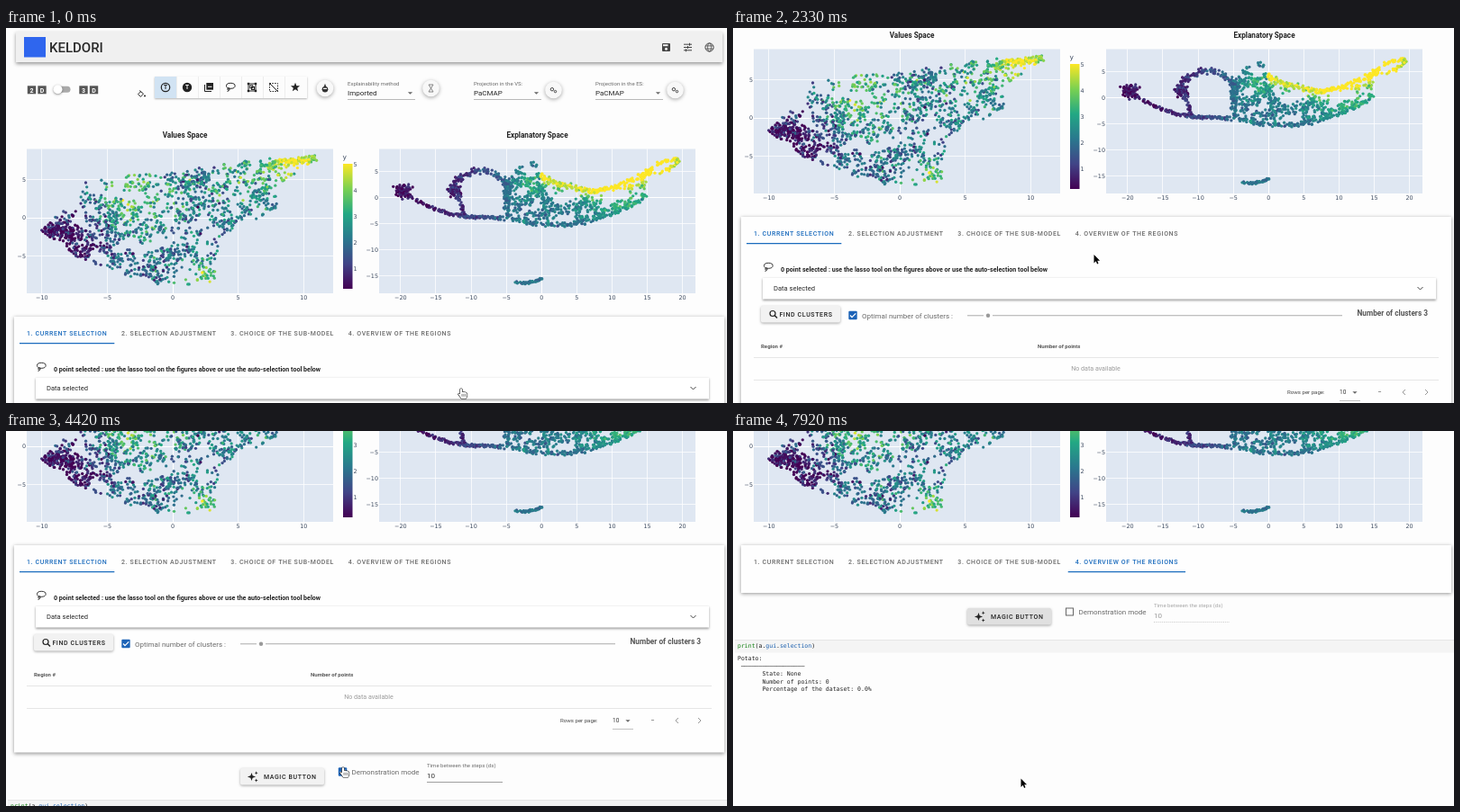
An HTML page with a canvas that plays this animation: 800x417 px, repeating every 8 s.

```html
<!DOCTYPE html>
<html lang="en">
<head>
<meta charset="utf-8">
<title>Explainability dashboard</title>
<style>
html, body { margin: 0; width: 100%; height: 100%; overflow: hidden; background: #fdfdfd; }
canvas { display: block; width: 800px; height: 417px; }
</style>
</head>
<body>
<canvas id="stage" width="800" height="417"></canvas>
<script>
const W = 800, H = 417, LOOP = 8000, STEP = 1000 / 12;
const UNCHECK = 4580, PRESS = 7750;
const BLUE = '#1a6bbd', INK = '#252525', GREY = '#6a6a6a';
let c = document.getElementById('stage').getContext('2d');

// ---- drawing helpers ----
function text(s, x, y, size, color = INK, o = {}) {
  c.font = `${o.weight || 400} ${size}px ${o.family || 'Roboto, sans-serif'}`;
  c.letterSpacing = (o.gap || 0) + 'px';
  c.textAlign = o.align || 'left';
  c.fillStyle = color;
  c.fillText(s, x, y);
  return c.measureText(s).width;
}

function box(x, y, w, h, color, r = 0) {
  c.fillStyle = color;
  c.beginPath();
  c.roundRect(x, y, w, h, r);
  c.fill();
}

function frame(x, y, size, color, dash = []) {
  c.strokeStyle = color;
  c.lineWidth = 1;
  c.setLineDash(dash);
  c.strokeRect(x - size / 2, y - size / 2, size, size);
  c.setLineDash([]);
}

function disc(x, y, r, color) {
  c.fillStyle = color;
  c.beginPath();
  c.arc(x, y, r, 0, 7);
  c.fill();
}

function ring(x, y, rx, color, width = 1, ry = rx) {
  c.strokeStyle = color;
  c.lineWidth = width;
  c.beginPath();
  c.ellipse(x, y, rx, ry, 0, 0, 7);
  c.stroke();
}

function line(color, width, pts, dash = []) {
  c.strokeStyle = color;
  c.lineWidth = width;
  c.setLineDash(dash);
  c.beginPath();
  pts.forEach(p => c.lineTo(...p));
  c.stroke();
  c.setLineDash([]);
}

function star(x, y, r, inner, tips, color) {
  c.fillStyle = color;
  c.beginPath();
  for (let i = 0; i < tips * 2; i++) {
    const a = Math.PI * (i / tips - .5), d = i % 2 ? inner : r;
    c.lineTo(x + Math.cos(a) * d, y + Math.sin(a) * d);
  }
  c.fill();
}

function chevron(x, y, dx, dy, color) {
  line(color, 1, [[x - dx - dy * 2, y - dy - dx * 2], [x + dx, y + dy], [x - dx + dy * 2, y - dy + dx * 2]]);
}

function caret(x, y) {
  c.fillStyle = '#666';
  c.beginPath();
  [[-2.6, -1.3], [2.6, -1.3], [0, 1.3]].forEach(([dx, dy]) => c.lineTo(x + dx, y + dy));
  c.fill();
}

// Runs a drawing with a soft drop shadow under it.
function raised(blur, dy, alpha, draw) {
  c.save();
  c.shadowColor = `rgba(0,0,0,${alpha})`;
  c.shadowBlur = blur;
  c.shadowOffsetY = dy;
  draw();
  c.restore();
}

function button(x, y, w, label, color) {
  raised(3, 1, .35, () => box(x, y, w, 18.5, color, 2));
  text(label, x + w - 8.5, y + 11.9, 7, '#222', { weight: 500, gap: .625, align: 'right' });
}

function checkbox(x, y, on) {
  if (!on) return frame(x, y, 8, '#666');
  box(x - 4.7, y - 4.7, 9.4, 9.4, '#1c63b7', 1);
  line('#fff', 1.2, [[x - 3, y], [x - 1, y + 2.2], [x + 3.2, y - 2.2]]);
}

function search(x, y, r, color) {
  ring(x - 1, y - 1, r, color, 1.2);
  line(color, 1.4, [[x - 1 + r * .7, y - 1 + r * .7], [x + r + 1, y + r + 1]]);
}

function plus(x, y, r, color, turn = 0) {
  for (const a of [turn, turn + Math.PI / 2]) {
    const dx = Math.cos(a) * r, dy = Math.sin(a) * r;
    line(color, 1, [[x - dx, y - dy], [x + dx, y + dy]]);
  }
}

function lasso(x, y, size, color) {
  const s = size / 12;
  ring(x + .3 * s, y - 1.7 * s, 4.8 * s, color, s, 3 * s);
  ring(x - 2 * s, y + 2 * s, 1.2 * s, color, s);
  line(color, s, [[x - 1.8 * s, y + 3.2 * s], [x - 3.4 * s, y + 5 * s]]);
}

// ---- scatter plots ----
function seeded(a) {
  return () => {
    a = a + 0x6D2B79F5 | 0;
    let t = Math.imul(a ^ a >>> 15, 1 | a);
    t = t + Math.imul(t ^ t >>> 7, 61 | t) ^ t;
    return ((t ^ t >>> 14) >>> 0) / 4294967296;
  };
}
const rand = seeded(41);
const bell = () => rand() + rand() + rand() + rand() - 2;

const VIRIDIS = [[68, 1, 84], [65, 68, 135], [42, 120, 142], [34, 168, 132], [122, 209, 81], [253, 231, 37]];
function viridis(u) {
  const p = Math.max(0, Math.min(.9999, u)) * 5, i = Math.floor(p);
  return `rgb(${VIRIDIS[i].map((v, k) => Math.round(v + (VIRIDIS[i + 1][k] - v) * (p - i)))})`;
}

const bump = (x, y, cx, cy, r) => Math.exp(-((x - cx) ** 2 + (y - cy) ** 2) / r ** 2);

const leftValue = (x, y) => 1.9 + bell() * 1.2
  - 1.7 * bump(x, y, 65, 235, 48)
  + 1.9 * bump(x, y, 140, 185, 42)
  + 3.2 * bump(x, y, 322, 147, 36)
  + 1.1 * bump(x, y, 255, 165, 38)
  + 2.1 * bump(x, y, 220, 284, 24);

const ridge = x => 180 - .0052 * (x - 650) ** 2;
const keel = x => 219 - .0031 * (x - 610) ** 2;
const crown = x => x < 591 ? 149 + .03 * (x - 583) ** 2 : ridge(x);

function rightValue(x, y) {
  const noise = bell() * .6;
  if (x < 556) return .4 + 1.5 * ((x - 440) / 115) ** 2 + noise;
  const crest = x > 592 ? 2.6 * Math.exp(-(((y - ridge(x)) / 9) ** 2)) : 0;
  return 2.1 + noise + crest + 1.2 * bump(x, y, 582, 173, 16) + 1.2 * bump(x, y, 690, 185, 40)
    + 2.6 * bump(x, y, 735, 152, 26);
}

// Tight clumps of points kept inside a region.
function clumps(count, spread, pick, inside) {
  const out = [];
  while (out.length < count) {
    const [x, y] = pick();
    for (let i = 0; i < 7; i++) {
      const p = [x + bell() * spread, y + bell() * spread];
      if (inside(...p)) out.push(p);
    }
  }
  return out;
}

function curve(count, jitter, at) {
  return Array.from({ length: count }, () => {
    const [x, y] = at(rand());
    return [x + bell() * jitter, y + bell() * jitter];
  });
}
const blob = (count, size, x, y) => curve(count, size, () => [x, y]);
const arc = (x, y, rx, ry, a) => [x + Math.cos(a) * rx, y + Math.sin(a) * ry];

function leftDots() {
  const edge = new Path2D('M39 225L62 203 78 200 88 166 180 161 285 145 347 143 306 172 301 200 236 235 232 285 160 285 72 252z');
  const inside = (x, y) => c.isPointInPath(edge, x, y);
  return [
    ...clumps(1550, 7, () => [38 + rand() * 310, 143 + rand() * 143], inside),
    ...curve(110, 3.5, s => [283 + 60 * s, 153 - 7 * s]),
    ...curve(90, 6, s => [45 + 55 * s, 225 + 8 * s * s])
  ];
}

function rightDots() {
  const inMass = (x, y) => x > 555 && x < 712 && y > crown(x) && y < keel(x);
  return [
    ...blob(75, 6.5, 441, 181),
    ...curve(150, 1.6, s => [443 + 110 * s, 211 - 28 * (1 - s) ** 3]),
    ...blob(55, 6.5, 497, 181),
    ...curve(130, 3, s => arc(527, 184, 32, 25, Math.PI * (1 + s))),
    ...curve(40, 2, s => [500 + 8 * s, 178 + 30 * s]),
    ...curve(75, 3, s => [554 + 3 * s, 170 + 40 * s]),
    ...clumps(620, 5, () => [556 + rand() * 155, 146 + rand() * 74], inMass),
    ...curve(140, 2, s => [556 + 152 * s, keel(556 + 152 * s)]),
    ...curve(150, 2.3, s => [592 + 122 * s, ridge(592 + 122 * s)]),
    ...curve(75, 1.8, s => {
      const [x, y] = arc(729, 154, 17, 5, s * 7);
      return [x, y - (x - 729) * .4];
    }),
    ...curve(50, 1.5, s => [565 + 29 * s, 283 - 4 * s ** 4])
  ];
}

const tickFont = { family: '"DejaVu Sans", Verdana, sans-serif' };
const SLATE = '#3c4a60';
const signed = n => String(n).replace('-', '\u2212');

function plot(x, w, xAxis, yAxis, dots, value) {
  box(x, 134.5, w, 160.5, '#dfe7f2');
  for (let n = -xAxis.max; n <= xAxis.max; n += 5) {
    const px = xAxis.zero + n * xAxis.unit;
    box(Math.round(px), 134.5, 1, 160.5, n ? 'rgba(255,255,255,.75)' : '#fff');
    text(signed(n), px + .5, 301.5, 6.4, SLATE, { ...tickFont, align: 'center' });
  }
  for (let n = yAxis.min; n <= 5; n += 5) {
    const py = yAxis.zero - n * yAxis.unit;
    box(x, Math.round(py), w, 1, n ? 'rgba(255,255,255,.75)' : '#fff');
    text(signed(n), x - 1, py + 2.8, 6.4, SLATE, { ...tickFont, align: 'right' });
  }
  for (const p of dots) disc(...p, 1.65, viridis((value(...p) - .2) / 4.8));
}

function paintPlots() {
  const layer = document.createElement('canvas'), screen = c;
  layer.width = W;
  layer.height = 310;
  c = layer.getContext('2d');
  plot(23, 340, { max: 10, zero: 184.5, unit: 14.52 }, { min: -5, zero: 210.6, unit: 8.48 }, leftDots(), leftValue);
  plot(414, 351, { max: 20, zero: 593.7, unit: 7.82 }, { min: -15, zero: 187.8, unit: 5.8 }, rightDots(), rightValue);
  const bar = c.createLinearGradient(0, 290, 0, 151);
  for (let i = 0; i <= 5; i++) bar.addColorStop(i / 5, viridis(i / 5));
  box(374, 151, 10.5, 139, bar);
  for (let n = 1; n < 6; n++) text(n, 385.5, 298.8 - n * 29, 6.4, SLATE, tickFont);
  text('y', 373.5, 146, 7.5, SLATE, tickFont);
  c = screen;
  return layer;
}

// ---- page parts ----
function header() {
  raised(4, 1.5, .4, () => box(11, 4, 784, 34, '#f0f0f0'));
  box(20, 10, 24, 22.5, '#2f66ee');
  text('KELDORI', 48, 26.7, 15, '#2a2a2a', { weight: 500 });
  const tone = '#444', y = 21.5;
  box(728, y - 4.5, 9, 9, tone, 1);
  box(729, y - 3.3, 5.5, 2, '#f0f0f0');
  disc(732.5, y + 1.8, 1.5, '#f0f0f0');
  for (let i = -1; i < 2; i++) {
    line(tone, 1, [[752, y + i * 3.3], [761, y + i * 3.3]]);
    box(756 - i * 2, y + i * 3.3 - 1.5, 1, 3, tone);
  }
  ring(780.5, y, 4.6, tone);
  ring(780.5, y, 2, tone, .8, 4.6);
  for (const dy of [-1.6, 1.6]) line(tone, .8, [[776.3, y + dy], [784.7, y + dy]]);
}

function select(x, name, value) {
  text(name, x, 64.3, 6.05, GREY);
  text(value, x, 75, 8);
  line('#8a8a8a', .6, [[x, 79.5], [x + 75, 79.5]]);
  caret(x + 69.5, 72.5);
}

function roundButton(x, y) {
  raised(4, 1.2, .35, () => disc(x, y, 9.3, '#f8f8f8'));
}

function cogs(x, y) {
  roundButton(x, y);
  ring(x - 1.6, y - .8, 1.7, '#444');
  ring(x + 2, y + 1.6, 1.2, '#444');
}

function toolIcons(x, y) {
  const at = i => x + i * 24, tone = '#222', letter = { weight: 700, align: 'center' };
  ring(at(0), y, 4.7, tone, 1.2);
  text('T', at(0), y + 2.4, 6.5, tone, letter);
  disc(at(1), y, 5.2, tone);
  text('T', at(1), y + 2.4, 6.5, '#fff', letter);
  line(tone, 1, [[at(2) - 4.5, y - 3], [at(2) - 4.5, y + 4.5], [at(2) + 3, y + 4.5]]);
  box(at(2) - 2.7, y - 5, 7.7, 7.7, tone);
  box(at(2) - 1, y - 1.2, 4.5, 1, '#fff');
  lasso(at(3), y, 12, tone);
  frame(at(4), y, 8, tone);
  for (const dx of [-4, 4]) for (const dy of [-4, 4]) box(at(4) + dx - 1.2, y + dy - 1.2, 2.4, 2.4, tone);
  frame(at(4) - .7, y - .7, 3, tone);
  frame(at(4) + 1, y + 1, 3, tone);
  frame(at(5), y, 9, tone, [1.5, 1.3]);
  line(tone, 1, [[at(5) - 5, y - 5], [at(5) + 5, y + 5]]);
  star(at(6), y, 5.3, 2.3, 5, tone);
}

function toolbar() {
  [...'2D3D'].forEach((s, i) => {
    const x = 28.5 + i % 2 * 11.5 + (i > 1 ? 57.5 : 0);
    box(x - 4.7, 64.3, 9.4, 9, '#555');
    text(s, x, 71.5, 7, '#fff', { weight: 700, align: 'center' });
  });
  box(53, 64.8, 18.5, 7, '#aaa', 3.5);
  raised(2.5, .8, .45, () => disc(57.5, 68.3, 5, '#fff'));
  line('#333', 1, [[148, 69.5], [152.5, 73], [149.5, 76.5], [146.5, 73.5], [150, 70.5]]);
  disc(154, 75.5, 1.1, '#333');

  raised(2, .5, .3, () => box(165, 54, 169, 24, '#fcfcfc'));
  box(165, 54, 24, 24, '#d1e3f3');
  for (let i = 1; i < 7; i++) box(165 + i * 24, 54, .5, 24, '#ddd');
  toolIcons(177, 66);

  roundButton(354, 67);
  disc(354, 68.3, 3.2, '#333');
  star(354, 66.3, 4.5, 1.6, 3, '#333');
  box(352, 66.8, 4, 1.2, '#f8f8f8');
  select(379, 'Explainability method', 'Imported');
  roundButton(471.5, 67);
  line('#777', .9, [[469, 63], [474, 63], [469, 71], [474, 71], [469, 63]]);
  select(519, 'Projection in the VS:', 'PaCMAP');
  cogs(607.5, 69);
  select(654, 'Projection in the ES:', 'PaCMAP');
  cogs(742.5, 69);
}

function modebar(alpha) {
  if (alpha <= 0) return;
  const y = 141, tone = '#a9aeb7', pale = '#e8eef6';
  c.save();
  c.globalAlpha = alpha;
  box(664, 135, 121, 12, 'rgba(229,236,246,.5)');
  box(669.5, y - 2.5, 8, 6, tone, 1);
  disc(673.5, y + .5, 1.5, pale);
  search(689.5, y, 2.6, tone);
  plus(702, y, 4, tone);
  frame(714, y, 7, tone, [1.5, 1]);
  lasso(726, y, 9, '#5d6168');
  for (const x of [741.5, 753.5]) {
    box(x - 3.8, y - 3.8, 7.6, 7.6, tone);
    box(x - 2.3, y - .5, 4.6, 1, pale);
  }
  box(741, y - 2.3, 1, 4.6, pale);
  plus(766, y, 4.5, tone, Math.PI / 4);
  star(778, y - 1, 4, 2, 3, tone);
  box(775.3, y, 5.4, 3.3, tone);
  c.restore();
}

function card(height, active) {
  raised(4, 1.2, .42, () => box(9, 321, 788, height, '#fefefe'));
  let x = 23;
  ['CURRENT SELECTION', 'SELECTION ADJUSTMENT', 'CHOICE OF THE SUB-MODEL', 'OVERVIEW OF THE REGIONS'].forEach((name, i) => {
    const on = i === active;
    const w = text(`${i + 1}. ${name}`, x, 341.6, 7, on ? BLUE : GREY, { weight: 500, gap: .625 });
    if (on) box(x - 8, 350, w + 16, 1.2, BLUE);
    x += w + 15.7;
  });
}

function selection() {
  const bold = { weight: 700 };
  lasso(39, 377, 12, '#333');
  text('0 point selected : use the lasso tool on the figures above or use the auto-selection tool below',
    53, 381.5, 7.12, '#222', bold);
  raised(2.5, 1, .4, () => box(33, 389, 747, 23.5, '#fff'));
  text('Data selected', 45, 403.2, 7.55);
  chevron(762.5, 400.5, 0, 1.5, '#444');

  button(31, 420, 88, 'FIND CLUSTERS', '#f2f2f2');
  search(45, 429.5, 3, '#222');
  checkbox(133, 430.5, true);
  text('Optimal number of clusters :', 143, 433.5, 8.03, GREY);
  box(260, 430.3, 18, 1, '#aaa');
  box(288, 430.3, 388, 1, '#aaa');
  disc(283, 430.8, 2.2, '#999');
  text('Number of clusters 3', 771, 431, 8.3, '#555', { ...bold, align: 'right' });

  text('Region #', 31, 467.2, 6.05, '#555', bold);
  text('Number of points', 338, 467.2, 6.05, '#555', bold);
  for (const y of [477, 502]) box(23, y, 760, .7, '#dedede');
  text('No data available', 402.5, 492, 7.1, '#9a9a9a', { align: 'center' });
  text('Rows per page:', 615, 518.3, 6.1, '#444');
  text('10', 673, 518.3, 6.5, '#333');
  box(673, 525, 23, .6, '#999');
  caret(690, 516.5);
  text('\u2013', 715.5, 518.3, 6.3, '#444');
  chevron(744.5, 516, -1.5, 0, '#999');
  chevron(769.5, 516, 1.5, 0, '#999');
}

function footer(demo, hover) {
  button(260, 569, 93, 'MAGIC BUTTON', hover ? '#e0e0e0' : '#f2f2f2');
  star(272.5, 578.5, 4.6, 1.6, 4, '#222');
  for (const y of [574.3, 582.5]) star(277.7, y, 2, .8, 4, '#222');
  checkbox(373.5, 573, demo);
  text('Demonstration mode', 383.5, 576.2, 8, GREY);
  text('Time between the steps (ds)', 467, 568.4, 6.05, demo ? GREY : '#a5a5a5');
  text('10', 467, 580, 8, demo ? '#333' : '#999');
  line(demo ? '#888' : '#bbb', .8, [[467, 584.5], [551, 584.5]], demo ? [] : [1, 1.2]);
}

function notebook() {
  const mono = { family: '"DejaVu Sans Mono", monospace' }, size = 6.5;
  box(2, 604, 798, 14.5, '#f4f4f4');
  box(2, 604, 798, .7, '#e2e2e2');
  let x = 5;
  for (const word of ['print', '(a.', 'gui', '.', 'selection', ')']) {
    const color = word === 'print' ? '#128012' : /^\w+$/.test(word) ? '#1a5fae' : '#222';
    x += text(word, x, 612.8, size, color, mono);
  }
  ['Potato:', ' ' + '\u2500'.repeat(18), '       State: None', '       Number of points: 0', '       Percentage of the dataset: 0.0%']
    .forEach((s, i) => text(s, 5, 627.3 + i * 8.4, size, '#222', mono));
}

// ---- motion ----
function ease(t, from, to) {
  const u = Math.max(0, Math.min(1, (t - from) / (to - from)));
  return u * u * (3 - 2 * u);
}

const scrollAt = t => Math.round(111 * ease(t, 1580, 2330) + 77 * ease(t, 2580, 3170) + 6 * ease(t, 3420, 3600));

function pointerAt(t) {
  const out = ease(t, 250, 830), down = ease(t, 3500, 4170), left = ease(t, 5080, 5750);
  return [505 - 104.5 * out - 26.5 * down - 54.5 * left, 401 - 149 * out + 122 * down + 12.5 * left];
}

function cursor(x, y, hand) {
  const path = new Path2D(hand
    ? 'M-1.2 1Q0-.9 1.2 1V4Q2.4 3 3.2 4.3 5 3.4 6.6 5.6V8L5.5 10.9H.3L-3.2 6.3Q-3 4.9-1.2 6z'
    : 'M0 0V9.4L2.2 7.3 3.6 10.4 5 9.8 3.7 6.8H6.6z');
  c.save();
  c.translate(x, y);
  c.lineJoin = 'round';
  c.lineWidth = 1.1;
  c.strokeStyle = hand ? '#111' : '#fff';
  c.fillStyle = hand ? '#fff' : '#000';
  c.stroke(path);
  c.fill(path);
  if (hand) for (let i = 0; i < 3; i++) line('#333', .6, [[1 + i * 1.9, 5.8], [1 + i * 1.9, 8.8]]);
  c.restore();
}

const plots = paintPlots();

function draw(now) {
  const t = Math.floor((now % LOOP + 5) / STEP) * STEP;
  const scroll = scrollAt(t), [x, y] = pointerAt(t);
  const done = t >= PRESS;
  const over = (x0, y0, w, h) => x > x0 && x < x0 + w && y + scroll > y0 && y + scroll < y0 + h;
  const onButton = over(260, 569, 93, 18.5);
  const hand = onButton || over(366, 565, 16, 17) || over(33, 389, 747, 23.5);

  box(0, 0, W, H, '#fdfdfd');
  c.save();
  c.translate(0, -scroll);
  header();
  toolbar();
  const title = { weight: 700, align: 'center' };
  text('Values Space', 198.5, 121.7, 8.2, '#222', title);
  text('Explanatory Space', 589.5, 121.7, 8.2, '#222', title);
  c.drawImage(plots, 0, 0);
  modebar(ease(t, 580, 830) - ease(t, 1920, 2250));
  card(done ? 53 : 230.5, done ? 3 : 0);
  if (!done) selection();
  else c.translate(0, -178);
  footer(t < UNCHECK, onButton || done);
  notebook();
  c.restore();
  cursor(x, y, hand && !done);
}

function loop() {
  draw(performance.now());
  requestAnimationFrame(loop);
}
loop();
</script>
</body>
</html>
```
